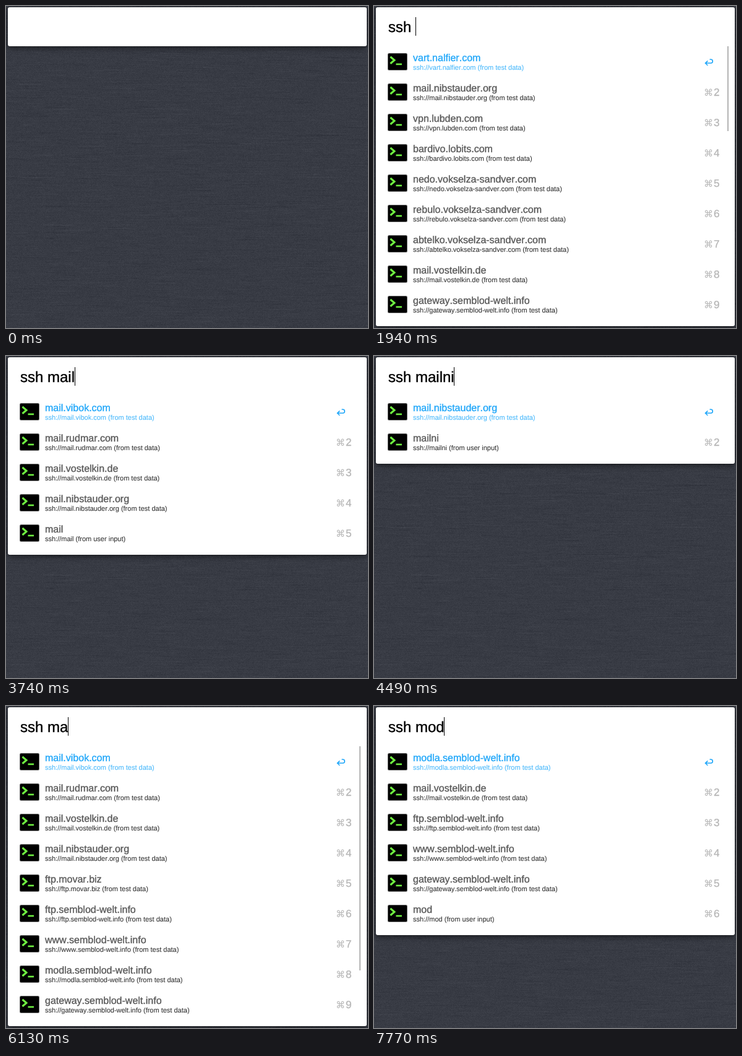
An HTML page with a canvas that plays this animation: 585 px wide and 520 px high, repeating every 8000 ms.

```html
<!DOCTYPE html>
<html lang="en">
<head>
<meta charset="utf-8">
<title>Launcher search</title>
<style>
  html, body { margin: 0; width: 100%; height: 100%; overflow: hidden; background: #383b44; }
  #stage { position: relative; width: 585px; height: 520px; overflow: hidden; }
  #linen, #view { position: absolute; left: 0; top: 0; display: block; }
  #panel {
    position: absolute; left: 3px; top: 2px; width: 580px;
    background: #fff; border-radius: 3px;
    box-shadow: 0 3px 10px rgba(0, 0, 0, .5), 0 0 2px rgba(0, 0, 0, .45);
  }
  text {
    font-family: "Liberation Sans", Arial, sans-serif; font-kerning: none;
    white-space: pre; text-rendering: geometricPrecision;
    fill: currentColor; stroke: currentColor; stroke-width: 0;
  }
  .query { font-size: 24px; color: #000; stroke-width: .4px; }
  .title { font-size: 16px; color: #585858; stroke-width: .35px; }
  .sub { font-size: 11px; color: #363636; stroke-width: .1px; }
  .first .title { color: #1ea6f9; }
  .first .sub { color: #4dbafb; }
  .num, .cmd { color: #b5b5b5; }
  .num { font-size: 17px; stroke-width: .3px; }
  .cmd { font-family: "DejaVu Sans", sans-serif; font-size: 15px; text-anchor: middle; }
</style>
</head>
<body>
<div id="stage">
  <canvas id="linen" width="585" height="520"></canvas>
  <div id="panel"></div>
  <svg id="view" width="585" height="520" viewBox="0 0 585 520"></svg>
</div>
<script>
const LOOP = 8000;
const byId = id => document.getElementById(id);
const panel = byId('panel'), view = byId('view');
const ctx = byId('linen').getContext('2d');

// Woven backdrop: fine grain plus short horizontal threads.
function paintLinen() {
  const w = 585, h = 520;
  let seed = 7;
  const rnd = () => (seed = (seed * 16807) % 2147483647) / 2147483647;
  const shade = new Float32Array(w * h);
  for (let i = 0; i < shade.length; i++) shade[i] = (rnd() - .5) * 11;
  for (let n = 0; n < 5200; n++) {
    const y = Math.floor(rnd() * h), x = Math.floor(rnd() * (w + 40)) - 40;
    const len = 8 + rnd() * 40, tone = (rnd() - .5) * 9;
    for (let k = Math.max(0, x); k < Math.min(w, x + len); k++) shade[y * w + k] += tone;
  }
  const img = ctx.createImageData(w, h);
  shade.forEach((v, i) => img.data.set([56 + v, 59 + v, 68 + v, 255], i * 4));
  ctx.putImageData(img, 0, 0);
}

const host = name => ({ title: name, sub: `ssh://${name} (from test data)` });
const typed = name => ({ title: name, sub: `ssh://${name} (from user input)` });
const app = (title, path, shape, color) => ({ title, sub: path, shape, color });

const welt = ['ftp', 'www', 'modla', 'gateway'].map(n => host(n + '.semblod-welt.info'));
const [ftp, www, modla, gateway] = welt;
const vibok = host('mail.vibok.com');
const rudmar = host('mail.rudmar.com');
const vostelkin = host('mail.vostelkin.de');
const nib = host('mail.nibstauder.org');
const movar = host('ftp.movar.biz');
const sandver = ['nedo', 'rebulo', 'abtelko'].map(n => host(n + '.vokselza-sandver.com'));

const lists = {
  none: { rows: [] },
  apps: { bar: 112, rows: [
    app('System Preferences', '/Applications/System Preferences.app', 'square', '#85878a'),
    app('SlumberPanel', '/Users/pel/Applications/SleepDisplay.app', 'square', '#2a2a2c'),
    app('StemBranch', '/Applications/SourceTree.app', 'circle', '#1d4d7d'),
    app('Stellar Note New Window', '/Users/pel/Applications/Sublime Text New Window.app', 'square', '#4d4d4d'),
    app('App Shelf', '/Applications/App Store.app', 'circle', '#1c8df3'),
    app('Stroll', '/Applications/Safari.app', 'circle', '#2a8fe3'),
    app('Stellar Note', '/Applications/Sublime Text.app', 'square', '#4d4d4d'),
    app('Seekbeam', '/System/Library/PreferencePanes/Spotlight.prefPane', 'circle', '#1b93f2'),
    app('Seafile Client', '/Applications/Seafile Client.app', 'circle', '#f3a32e')
  ] },
  all: { bar: 202, rows: [host('vart.nalfier.com'), nib, host('vpn.lubden.com'),
    host('bardivo.lobits.com'), ...sandver, vostelkin, gateway] },
  mai: { bar: 427, rows: [vibok, rudmar, vostelkin, nib, movar, ...welt] },
  mail: { rows: [vibok, rudmar, vostelkin, nib, typed('mail')] },
  mailni: { rows: [nib, typed('mailni')] },
  mailnib: { rows: [nib, typed('mailnib')] },
  fresh: { rows: [{ title: nib.title, sub: 'Connection not from history' }, typed('mailnib')] },
  mo: { bar: 427, rows: [modla, vostelkin, ftp, www, gateway, rudmar, nib, vibok, movar] },
  mod: { rows: [modla, vostelkin, ftp, www, gateway, typed('mod')] }
};

// [start ms, query, list, caret visible]
const steps = [
  [0, '', 'none', 0], [150, '', 'none', 1], [750, '', 'none', 0], [1200, '', 'none', 1],
  [1340, 's', 'apps', 1], [1640, 'ss', 'apps', 1], [1790, 'ssh', 'apps', 1], [1940, 'ssh ', 'all', 1],
  [2390, 'ssh m', 'all', 1], [2540, 'ssh mai', 'mai', 1], [2690, 'ssh mail', 'mai', 1],
  [2840, 'ssh mail', 'mail', 1], [3290, 'ssh mail', 'mail', 0], [3740, 'ssh mail', 'mail', 1],
  [4340, 'ssh mailn', 'mail', 1], [4490, 'ssh mailni', 'mailni', 1], [4640, 'ssh mailnib', 'mailni', 1],
  [4790, 'ssh mailnib', 'mailnib', 1], [5240, 'ssh mailnib', 'mailnib', 0], [5530, 'ssh mailnib', 'fresh', 0],
  [5830, 'ssh mailni', 'mailni', 1], [5980, 'ssh mail', 'mail', 1], [6130, 'ssh ma', 'mai', 1],
  [6280, 'ssh ', 'all', 1], [6580, 'ssh ', 'all', 0], [7180, 'ssh ', 'all', 1],
  [7320, 'ssh m', 'all', 1], [7470, 'ssh mo', 'mo', 1], [7620, 'ssh mod', 'mo', 1], [7770, 'ssh mod', 'mod', 1]
];

const text = (cls, x, y, s) => `<text class="${cls}" x="${x}" y="${y}">${s}</text>`;
const rect = (x, y, w, h, fill, r = 0) =>
  `<rect x="${x}" y="${y}" width="${w}" height="${h}" rx="${r}" fill="${fill}"/>`;
const line = (d, color, width) =>
  `<path d="${d}" fill="none" stroke="${color}" stroke-width="${width}"/>`;

function icon({ shape, color }) {
  if (shape === 'circle') return `<circle cx="38" cy="90" r="17" fill="${color}"/>`;
  if (shape === 'square') return rect(21, 73, 34, 34, color, 3);
  return rect(22, 76, 32, 28, '#666', 2.5) + rect(23, 77, 30, 26, '#000', 1.5) +
    line('M26.5 82L33 87.5L26.5 93', '#6ff041', 3) + line('M35.5 94H45', '#6ff041', 2.6);
}

const enter = line('M536 92.3H544.3A3 3 0 0 0 544.3 86.3H542.5M539.3 88.6L535.5 92.3L539.3 96', '#1ea6f9', 1.6);

function row(item, i) {
  const key = i ? text('cmd', 540.5, 96, '⌘') + text('num', 549, 96, i + 1) : enter;
  return `<g class="${i ? '' : 'first'}" transform="translate(0 ${49 * i})">` +
    icon(item) + text('title', 63, 89, item.title) + text('sub', 63, 103, item.sub) + key + '</g>';
}

function caretX(query) {
  ctx.font = '24px "Liberation Sans", Arial, sans-serif';
  ctx.textRendering = 'geometricPrecision';
  ctx.fontKerning = 'none';
  return Math.floor(23 + ctx.measureText(query).width);
}

function draw([, query, name, caret]) {
  const { rows, bar } = lists[name];
  panel.style.height = (rows.length ? 74 + 49 * rows.length : 63) + 'px';
  view.innerHTML = text('query', 23, 42, query) +
    (caret ? rect(caretX(query), 18, 1, 30, '#000') : '') +
    rows.map(row).join('') +
    (bar ? rect(571, 65, 2, bar - 65, '#b4b4b4') : '');
}

let shown = -1;
function tick() {
  const t = performance.now() % LOOP;
  const at = steps.findLastIndex(s => s[0] <= t);
  if (at !== shown) draw(steps[shown = at]);
  requestAnimationFrame(tick);
}

paintLinen();
tick();
</script>
</body>
</html>
```
